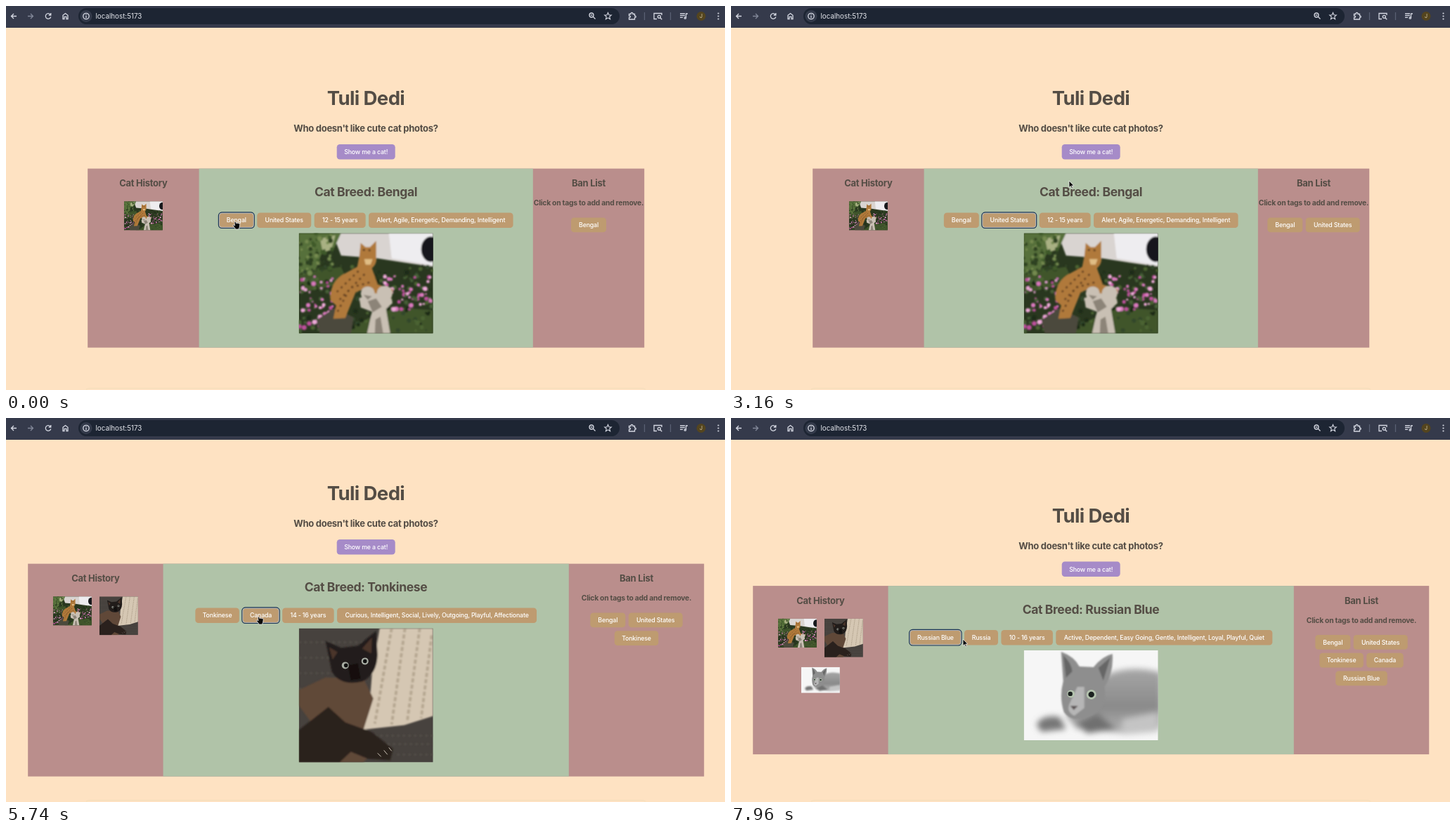
These frames come from a looping animation (1023 by 547 pixels, 8000 ms). An HTML page:

```html
<!DOCTYPE html>
<html lang="en">
<head>
<meta charset="utf-8">
<title>Cat viewer</title>
<style>
  html, body { margin: 0; height: 100%; overflow: hidden; background: #fee2c2; }
  svg#stage { display: block; width: 100vw; height: 100vh; }
  text { font-family: Inter, "Open Sans", sans-serif; text-anchor: middle; }
  .head { fill: #544d45; font-weight: 700; letter-spacing: -.022em; }
  .label { fill: #fff; font-size: 8.8px; font-weight: 500; letter-spacing: -.018em; }
  .icon { fill: none; stroke: #d5d8e2; stroke-width: 1.3; }
</style>
</head>
<body>
<svg id="stage" viewBox="0 0 1023 547" preserveAspectRatio="none">
  <defs>
    <filter id="soft" x="-5%" y="-5%" width="110%" height="110%"><feGaussianBlur stdDeviation=".9"/></filter>
    <filter id="haze" x="-20%" y="-20%" width="140%" height="140%"><feGaussianBlur stdDeviation="4"/></filter>
    <linearGradient id="fur" x1="0" y1="0" x2="0" y2="1">
      <stop offset="0" stop-color="#a6a6a6"/><stop offset=".6" stop-color="#8a8a8a"/><stop offset="1" stop-color="#b4b4b4"/>
    </linearGradient>
    <symbol id="photo0" viewBox="0 0 191 143">
      <path fill="#29371f" d="M0 0H191V143H0Z"/>
      <g filter="url(#soft)">
        <path fill="#d9d4d1" d="M48 0H191V48L150 42L112 36L60 32Z"/>
        <path fill="#eeedf0" d="M128 0H191V46L132 36Z"/>
        <path fill="#56703a" d="M0 0H60L50 22L32 30L24 52L0 60Z"/>
        <path fill="#a9b183" d="M30 8L52 3L46 24L34 27Z"/>
        <ellipse cx="188" cy="23" rx="14" ry="18" fill="#17181c"/>
        <path fill="#40552b" d="M58 143L130 105L191 110V143ZM0 58L60 48L70 70L0 86Z"/>
        <g id="plants"></g>
        <path fill="#4b4a3c" d="M25 124L50 107L78 120L74 143H30Z"/>
        <path fill="#b0793a" d="M88 14L95 20H101L110 11L110 34Q112 43 104 50L112 73L134 80L133 87L108 87L98 78L81 84L66 121L49 122L53 103L45 96Q43 73 61 60L83 48L86 33Z"/>
        <path fill="none" stroke="#603d20" stroke-width="2.6" stroke-dasharray="3 5" d="M54 84L87 52M58 95L95 57M55 112L73 78L102 70M91 24L107 25"/>
        <path fill="#e0bd85" d="M93 37L105 37L102 45L95 45Z"/>
        <g fill="#c9c0b4">
          <path d="M86 93Q104 82 118 88Q134 90 133 100L124 108L130 143H97L104 112L88 106Z"/>
          <circle cx="98" cy="86" r="10"/><circle cx="122" cy="86" r="11"/>
        </g>
        <path fill="#8c8478" d="M98 97L110 93L118 105L105 113ZM109 123L116 119L120 143H108ZM92 88L104 90L98 95Z"/>
      </g>
    </symbol>
    <symbol id="photo1" viewBox="0 0 191 191">
      <path fill="#47423e" d="M0 0H191V191H0Z"/>
      <g filter="url(#soft)">
        <path fill="none" stroke="#59534d" stroke-width="2" stroke-dasharray="3 5" d="M0 20H120M0 42H110M0 64H50M0 86H40M0 108H30M100 153H191M110 165H191M140 180H191"/>
        <path fill="#d5c7b3" d="M115 0H191V125L150 138L88 145L101 105L104 65Z"/>
        <path fill="none" stroke="#b6a792" stroke-width="4" stroke-dasharray="6 3" d="M132 0L108 136M151 0L132 137M172 0L154 134M189 10L174 128"/>
        <path fill="#604838" d="M38 70L92 72L106 100L92 144L118 160L92 191H0V160L22 140L0 110V88Z"/>
        <path fill="#2a211d" d="M0 145L42 112L66 134L104 148L134 172L130 188L98 186L74 176L58 191H0Z"/>
        <path fill="#211c1a" d="M38 18L60 28L84 25L110 4L112 38Q111 66 90 76Q59 83 47 62Z"/>
        <path fill="#4b352b" d="M43 27L55 34L48 45ZM104 13L90 29L103 36Z"/>
        <path fill="#12100f" d="M70 53L84 50L88 72L74 74Z"/>
      </g>
      <g fill="#a9aea4"><circle cx="66" cy="53" r="5"/><circle cx="94" cy="47" r="5"/></g>
      <g fill="#111"><circle cx="67" cy="53" r="2.8"/><circle cx="94" cy="47" r="2.8"/></g>
      <path fill="none" stroke="#cfc6b9" d="M112 178l5 5M121 174l5 6M128 170l4 5"/>
    </symbol>
    <symbol id="photo2" viewBox="0 0 191 128">
      <path fill="#f6f6f6" d="M0 0H191V128H0Z"/>
      <g filter="url(#haze)">
        <path fill="url(#fur)" d="M108 40Q145 18 196 32V110L140 118L75 112L60 92Z"/>
        <path fill="#777" d="M18 106Q25 91 51 95L60 112L25 116Z"/>
        <path fill="#707070" d="M74 104L104 90L132 112L90 118Z"/>
        <path fill="#c4c4c4" d="M140 98L191 88V116L140 120Z"/>
      </g>
      <g filter="url(#soft)">
        <path fill="#8e8e8e" d="M53 2Q72 9 79 23L99 24Q112 8 126 5Q128 32 115 52Q120 84 94 94Q68 104 57 88Q50 67 56 44Z"/>
        <path fill="#666" d="M56 7Q67 17 69 30L60 39ZM123 10L106 25L113 43Z"/>
        <path fill="#b6b6b6" d="M76 52L86 52L86 82L72 93Q60 88 65 76Z"/>
        <path fill="#5d5556" d="M66 79L77 79L71 85Z"/>
      </g>
      <g fill="#b3c2ad"><circle cx="67" cy="62" r="5.5"/><circle cx="96" cy="63" r="7"/></g>
      <g fill="#1c2220"><circle cx="66" cy="62" r="3.2"/><circle cx="96" cy="63" r="4.2"/></g>
    </symbol>
  </defs>

  <path fill="#fee2c2" d="M0 0H1023V547H0Z"/>
  <path fill="none" stroke="#f3ddba" d="M114 546Q116 544.5 120 544.5H904Q908 544.5 910 546"/>
  <g id="page"></g>

  <path fill="#353a4b" d="M0 0H1023V31H0Z"/>
  <rect x="103" y="3" width="770" height="23" rx="11.5" fill="#1d2533"/>
  <circle cx="114" cy="14.5" r="8.5" fill="#343b4b"/>
  <g class="icon">
    <path d="M15 14.5H7.5M11 11L7.5 14.5L11 18"/>
    <path stroke="#828899" d="M31 14.5H38.5M35 11L38.5 14.5L35 18"/>
    <path d="M63 12A3.8 3.8 0 1 0 63.8 15.5M63.8 10V13H60.8"/>
    <path d="M81 13.3L84.5 10.5L88 13.3V18.5H86V15.3H83V18.5H81Z"/>
    <circle cx="114" cy="14.5" r="4.2"/><path d="M114 14V17M114 12V13"/>
    <circle cx="833" cy="13" r="3"/><path d="M835.3 15.3L838.5 18.5M831.7 13H834.3"/>
    <path stroke-width="1.1" d="M856.5 9.5L857.9 12.8L861.3 13L858.7 15.3L859.6 18.8L856.5 16.9L853.4 18.8L854.3 15.3L851.7 13L855.1 12.8Z"/>
    <path d="M886.5 11.5H889Q889 9.3 890.5 9.3T892 11.5H894.5V14Q896.3 14 896.3 15.2T894.5 16.5V19H886.5V16.5Q888.5 16.5 888.5 15.2T886.5 14Z"/>
    <path d="M926 18.5H922V10.5H933V13"/><circle cx="929.3" cy="15.3" r="2"/><path d="M930.8 16.8L933.3 19.3"/>
    <path stroke="#5a6073" d="M908.5 9V20M945.5 9V20"/>
    <path d="M959 11H966M959 13.7H966M959 16.4H963M967.5 17V11H970"/><circle cx="966.3" cy="17" r="1.2"/>
  </g>
  <circle cx="989" cy="14.5" r="6.5" fill="#54451f"/>
  <text x="989" y="17" font-size="7" fill="#e6d9b4">J</text>
  <g fill="#d5d8e2"><circle cx="1013.5" cy="10.5" r="1.1"/><circle cx="1013.5" cy="14.5" r="1.1"/><circle cx="1013.5" cy="18.5" r="1.1"/></g>
  <text x="127.5" y="18" font-size="9.8" fill="#e4e6ec" style="text-anchor:start">localhost:5173</text>

  <g id="cursor" fill="#080808" stroke="#fff" stroke-width=".7" stroke-linejoin="round">
    <path id="arrow" d="M0 0V9.6L2.2 7.5L3.9 11L5.3 10.3L3.7 7H6.8Z"/>
    <path id="hand" d="M-3-4Q-2-6-1-4L0-2Q0-5 1.3-4L1.8-2Q3-4 3.5-2Q4.8-3 4.8-1L4.2 3L3 6H-1.5L-2.5 4L-5 1Q-5-1-3.5 0L-2.5 1Z"/>
  </g>
</svg>

<script>
const $ = id => document.getElementById(id);
const LOOP = 8000, STEP = 88.05, BUTTON = 4, GAP = 4.4;

const cats = [
  { breed: 'Bengal', width: 792, photo: 143,
    tags: [['Bengal', 50], ['United States', 77], ['12 - 15 years', 73], ['Alert, Agile, Energetic, Demanding, Intelligent', 205.5]] },
  { breed: 'Tonkinese', width: 834, photo: 191,
    tags: [['Tonkinese', 62.5], ['Canada', 52.5], ['14 - 16 years', 73.5], ['Curious, Intelligent, Social, Lively, Outgoing, Playful, Affectionate', 284]] },
  { breed: 'Russian Blue', width: 962, photo: 128,
    tags: [['Russian Blue', 73.5], ['Russia', 48], ['10 - 16 years', 73.5], ['Active, Dependent, Easy Going, Gentle, Intelligent, Loyal, Playful, Quiet', 308]] }
];
const banned = [cats[0].tags[0], cats[0].tags[1], cats[1].tags[0], cats[1].tags[1], cats[2].tags[0]];

// Each timeline lists [start time, value].
const timeline = {
  cat: [[0, 0], [4220, 1], [6890, 2]],
  photo: [[0, 0], [4310, 1], [6980, 2]],
  layout: [[0, 0], [4220, 1], [5290, 2]],
  bans: [[0, 1], [260, 2], [5290, 3], [5830, 4], [7790, 5]],
  focus: [[0, 0], [170, 1], [710, 2], [1310, 3], [1760, 1], [2370, 0], [2890, 1],
          [3600, BUTTON], [5110, 0], [5740, 1], [6450, BUTTON], [7700, 0]]
};
const moves = [
  [0, 328, 312, 'hand'], [80, 328, 312, 'hand'], [350, 392, 313, 'hand'], [530, 392, 313, 'hand'],
  [880, 480, 314, 'hand'], [1050, 480, 314, 'hand'], [1310, 600, 317, 'hand'], [1580, 392, 320, 'hand'],
  [1930, 385, 312, 'hand'], [2280, 330, 312, 'hand'], [2800, 336, 312, 'hand'], [2980, 395, 312, 'hand'],
  [3150, 395, 312, 'hand'], [3160, 481, 249, 'arrow'], [3180, 481, 249, 'arrow'], [3430, 520, 210, 'hand'],
  [3680, 533, 211, 'hand'], [4210, 533, 211, 'hand'], [4220, 531, 206, 'arrow'], [4670, 531, 206, 'arrow'],
  [5020, 307, 290, 'hand'], [5470, 310, 290, 'hand'], [5740, 362, 288, 'hand'], [5920, 362, 288, 'hand'],
  [6360, 516, 192, 'hand'], [6890, 516, 192, 'hand'], [6960, 513, 187, 'arrow'], [7520, 312, 315, 'hand'],
  [7780, 314, 315, 'hand'], [7920, 330, 315, 'arrow']
];

const lastBefore = (list, t) => list.filter(item => item[0] <= t).pop();

const rect = (x, y, w, h, fill, rx = 0) =>
  `<rect x="${x}" y="${y}" width="${w}" height="${h}" rx="${rx}" fill="${fill}"/>`;

const heading = (text, x, y, size) =>
  `<text class="head" x="${x}" y="${y}" font-size="${size}">${text}</text>`;

const picture = (i, x, y, w) =>
  `<use href="#photo${i}" x="${x}" y="${y}" width="${w}" height="${w * cats[i].photo / 191}"/>`;

function button(text, x, y, w, h, fill, focused) {
  const ring = focused
    ? `<g fill="none"><rect x="${x - .4}" y="${y - .4}" width="${w + .8}" height="${h + .8}" rx="4.6" stroke="#1c3552" stroke-width="1.3"/>
       <rect x="${x + .6}" y="${y + .6}" width="${w - 1.2}" height="${h - 1.2}" rx="3.7" stroke="#b9cbe0" stroke-width=".7"/></g>` : '';
  return rect(x, y, w, h, fill, 4.3) + ring +
    `<text class="label" x="${x + w / 2}" y="${y + h / 2 + 3.2}">${text}</text>`;
}

function tagRow(tags, cx, y, h, focus) {
  let x = cx - (tags.reduce((sum, tag) => sum + tag[1] + GAP, -GAP)) / 2;
  return tags.map(([text, w], i) => {
    const tag = button(text, x, y, w, h, '#be9b70', i === focus);
    x += w + GAP;
    return tag;
  }).join('');
}

function drawPage({ cat, photo, layout, bans, focus }) {
  const { breed, tags } = cats[cat], height = cats[photo].photo;
  const width = cats[layout].width, side = width / 5, left = 512.2 - width / 2;
  const historyX = left + side / 2, banX = left + width - side / 2;
  const slots = cat ? [[-33, 0], [33, 0], [0, 69]] : [[0, 0]];

  let out = heading('Tuli Dedi', 512, 141, 27.5) +
    heading("Who doesn't like cute cat photos?", 512, 179, 13) +
    button('Show me a cat!', 470.7, 197, 83, 21.6, '#a68bc8', focus === BUTTON) +
    rect(left, 231.6, width, height + 112, '#ba8e8c') +
    rect(left + side, 231.6, side * 3, height + 112, '#b0c3a8') +
    heading('Cat History', historyX, 257, 13) +
    heading('Cat Breed: ' + breed, 512, 271, 17.5) +
    heading('Ban List', banX, 257, 13) +
    heading('Click on tags to add and remove.', banX, 284, 10.3) +
    tagRow(tags, 512.2, 294.4, 21.6, focus) +
    picture(photo, 416.7, 323.4, 191);
  for (let i = 0; i <= photo; i++)
    out += picture(i, historyX + slots[i][0] - 27.5, 278.3 + slots[i][1], 55);
  for (let i = 0; i < bans; i += 2)
    out += tagRow(banned.slice(i, Math.min(i + 2, bans)), banX, 301.4 + i * 12.9, 20.8);

  $('page').innerHTML = out;
  $('page').setAttribute('transform', `translate(0 ${(143 - height) / 2})`);
}

function drawCursor(t) {
  const from = lastBefore(moves, t), to = moves[moves.indexOf(from) + 1] || from;
  const p = to === from ? 0 : (t - from[0]) / (to[0] - from[0]);
  const ease = p * p * (3 - 2 * p);
  const mix = i => from[i] + (to[i] - from[i]) * ease;
  $('cursor').setAttribute('transform', `translate(${mix(1)} ${mix(2)})`);
  for (const kind of ['arrow', 'hand'])
    $(kind).style.display = kind === from[3] ? '' : 'none';
}

function plantGarden() {
  let seed = 7;
  const random = () => (seed = seed * 16807 % 2147483647) / 2147483647;
  const scatter = (count, x, y, w, h, colors) => {
    let out = '';
    for (let i = 0; i < count; i++)
      out += `<circle cx="${x + random() * w}" cy="${y + random() * h}" r="${1.3 + random() * 2.2}" fill="${colors[i % colors.length]}"/>`;
    return out;
  };
  const leaves = ['#1d2a18', '#4b6433', '#33472a'], petals = ['#d978bd', '#bd509c', '#eda9d8', '#476037'];
  $('plants').innerHTML = scatter(60, 0, 0, 50, 58, ['#3f5a2b', '#748a4f', '#2f4222']) +
    scatter(110, 0, 46, 191, 97, leaves) +
    scatter(70, 0, 62, 48, 78, petals) + scatter(60, 122, 60, 69, 50, petals);
}

let shown = '';
function frame() {
  const t = performance.now() % LOOP, state = {};
  for (const key in timeline) state[key] = lastBefore(timeline[key], t)[1];
  const key = JSON.stringify(state);
  if (key !== shown) drawPage(state);
  shown = key;
  drawCursor(Math.floor((t + 10) / STEP) * STEP);
  requestAnimationFrame(frame);
}
plantGarden();
frame();
</script>
</body>
</html>
```
